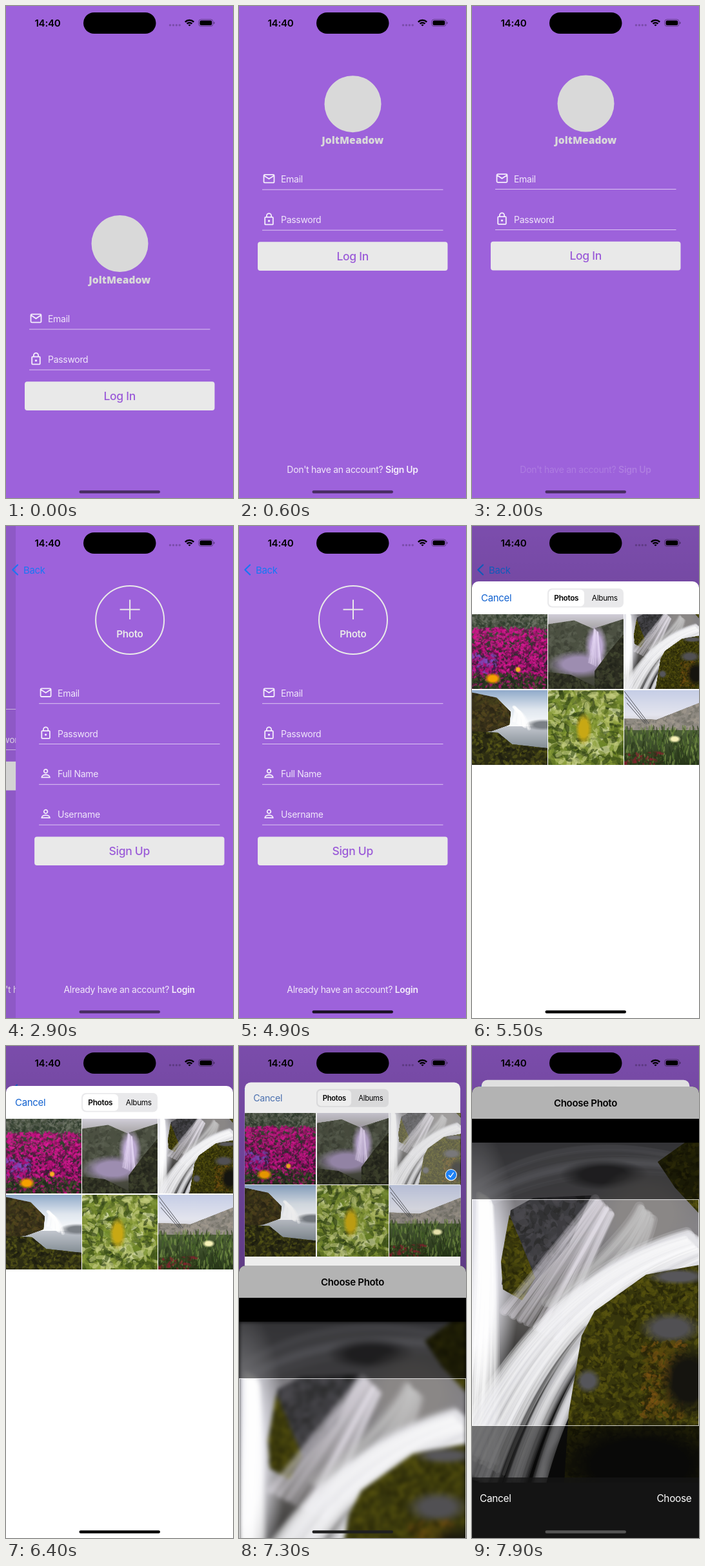
An HTML page with a canvas that plays this animation: 352x764 px, repeating every 8000 ms.

```html
<!DOCTYPE html>
<html lang="en">
<head>
<meta charset="utf-8">
<title>App sign up</title>
<style>
html, body { margin: 0; width: 100%; height: 100%; overflow: hidden; background: #9d62db; }
canvas { display: block; width: 352px; height: 764px; }
</style>
</head>
<body>
<canvas id="stage"></canvas>
<script>
const W = 352, H = 764, LOOP = 8000, TAU = Math.PI * 2;
const PURPLE = '#9d62db', LIGHT = '#e9e9e9', WHITE = '#f4edfb', BLUE = '#1478f5';
const UI = 'Inter, "Noto Sans", sans-serif';
const TOP = 62; // resting top of a sheet
const stage = document.getElementById('stage');
const dpr = window.devicePixelRatio || 1;
stage.width = W * dpr;
stage.height = H * dpr;
const g = stage.getContext('2d');

const clamp = x => Math.max(0, Math.min(1, x));
const lerp = (a, b, p) => a + (b - a) * p;
// system transition: fast start, long exponential tail
const settle = (t, start) => t <= start ? 0 : 1 - Math.exp(-9.15 * (t - start) / 1000);
// critically damped spring
const spring = (t, start) => {
  const x = Math.max(0, t - start) * 0.014;
  return 1 - (1 + x) * Math.exp(-x);
};
const mix = (a, b, p) => `rgb(${a.map((v, i) => Math.round(lerp(v, b[i], p))).join()})`;

function random(seed) {
  return () => {
    seed = (seed * 1664525 + 1013904223) >>> 0;
    return seed / 4294967296;
  };
}

// ---------- photos ----------

function photo(w, h, draw) {
  const cv = document.createElement('canvas');
  cv.width = w * 2;
  cv.height = h * 2;
  const c = cv.getContext('2d');
  c.scale(2, 2);
  draw(c, w, h);
  return cv;
}

function fade(c, y, w, h, ...colors) {
  const f = c.createLinearGradient(0, y, 0, y + h);
  colors.forEach((k, i) => f.addColorStop(i / (colors.length - 1), k));
  c.fillStyle = f;
  c.fillRect(0, y, w, h);
}

function glow(c, color, x, y, rx, ry) {
  const f = c.createRadialGradient(0, 0, 0, 0, 0, 1);
  f.addColorStop(0.5, color);
  f.addColorStop(1, color + '00');
  c.save();
  c.translate(x, y);
  c.scale(rx, ry);
  c.fillStyle = f;
  c.fillRect(-1, -1, 2, 2);
  c.restore();
}

// random soft dabs that cover a rectangle
function dabs(c, colors, size, x, y, w, h, flat = 0.5, tilt = 0, sway = 3) {
  const r = random(Math.round(size * 97 + x + y * 3 + w));
  c.save();
  c.globalAlpha = 0.6;
  for (let n = 1.3 * w * h / size ** 2; n > 0; n--) {
    const s = size * (0.4 + r());
    c.fillStyle = colors[Math.floor(r() * colors.length)];
    c.beginPath();
    c.ellipse(x + r() * w, y + r() * h, s, s * flat, tilt + sway * (r() - 0.5), 0, TAU);
    c.fill();
  }
  c.restore();
}

// a textured patch with the given corners
function land(c, colors, size, ...corners) {
  const xs = corners.map(p => p[0]), ys = corners.map(p => p[1]);
  const x = Math.min(...xs), y = Math.min(...ys);
  c.save();
  c.beginPath();
  corners.forEach(p => c.lineTo(...p));
  c.clip();
  c.fillStyle = colors[0];
  c.fillRect(x, y, 400, 600);
  dabs(c, colors, size, x, y, Math.max(...xs) - x, Math.max(...ys) - y);
  c.restore();
}

// a fan of translucent strands, widening towards its end
function stream(c, color, n, width, from, bend, to, spread) {
  const r = random(n * 31 + spread);
  c.save();
  c.strokeStyle = color;
  c.globalAlpha = 0.22;
  c.lineCap = 'round';
  for (let i = 0; i < n; i++) {
    const s = spread * (r() - 0.5);
    c.lineWidth = width * (0.4 + r());
    c.beginPath();
    c.moveTo(from[0] + s * 0.3, from[1] + s * 0.3);
    c.quadraticCurveTo(bend[0] + s * 0.5, bend[1] + s * 0.5, to[0] + s, to[1] + s * 0.5);
    c.stroke();
  }
  c.restore();
}

function river(c, w, h) {
  const moss = ['#37360c', '#4a480c', '#5c580f', '#252408'];
  const rock = ['#3d3c40', '#4b4a4f', '#2b2a2b'];
  fade(c, 0, w, h, '#6c6c72', '#858387', '#5c5a58', '#161616', '#131313');
  stream(c, '#a8a8b0', 14, 10, [0, 90], [150, 0], [352, 40], 90);
  glow(c, '#e0e0e8', 0, 200, 75, 230);
  stream(c, '#ffffff', 30, 12, [20, 90], [25, 270], [5, 480], 70);
  land(c, rock, 9, [60, 105], [95, 86], [185, 82], [150, 160], [100, 215], [78, 245], [46, 220]);
  land(c, moss, 5, [58, 112], [74, 150], [98, 210], [78, 245], [48, 228], [45, 185]);
  glow(c, '#3e3d40', 205, 50, 70, 24);
  glow(c, '#8a8786', 270, 110, 85, 75);
  stream(c, '#e6e4ea', 30, 9, [205, 100], [150, 190], [95, 285], 95);
  stream(c, '#c8c6ca', 20, 12, [270, 110], [250, 170], [150, 265], 80);
  stream(c, '#e2e2e8', 70, 14, [352, 160], [135, 235], [35, 530], 140);
  stream(c, '#ffffff', 30, 6, [345, 162], [125, 235], [20, 500], 110);
  land(c, moss, 5, [143, 528], [150, 420], [170, 300], [190, 262], [270, 205], [352, 190], [352, 528]);
  glow(c, '#57565a', 320, 208, 50, 13);
  glow(c, '#515053', 308, 288, 50, 26);
  glow(c, '#55555a', 180, 370, 20, 20);
  dabs(c, ['#7a5212', '#594a0e', '#2a2409'], 5, 265, 310, 65, 120);
  glow(c, '#15140f', 335, 370, 45, 60);
  glow(c, '#131310', 260, 500, 150, 75);
  land(c, moss, 5, [288, 30], [330, 0], [352, 0], [352, 110], [315, 70]);
}

function flowers(c, w, h) {
  fade(c, 0, w, h, '#5f6459', '#34402f', '#3b1f38', '#2b3020');
  dabs(c, ['#2c3829', '#707668', '#454f3c'], 3, 0, 0, w, 24);
  dabs(c, ['#d4148c', '#e21c9c', '#b30d76', '#6d0f4c'], 3, 0, 22, w, 74);
  dabs(c, ['#26381f', '#41562a', '#c41381', '#1d2a1b'], 3, 0, 92, w, 24);
  dabs(c, ['#7b4fc0', '#3a2347', '#b30d76'], 3, 0, 60, 38, 32);
  glow(c, '#f5a000', 32, 100, 13, 9);
  glow(c, '#f8b020', 71, 86, 5, 5);
}

function gorge(c, w, h) {
  const slope = ['#4c5042', '#5c6152', '#3c4034'];
  const cliff = ['#2b2c20', '#3a3b2b', '#454a31', '#20221a'];
  fade(c, 0, w, h, '#d2cfda', '#88867e', '#5b5c4f', '#3c3e33');
  land(c, slope, 5, [0, 16], [40, 10], [72, 24], [60, 90], [0, 100]);
  land(c, slope, 5, [66, 24], [w, 8], [w, 70], [86, 70]);
  glow(c, '#9d8db0', 48, 78, 50, 22);
  glow(c, '#bba9d0', 74, 50, 18, 34);
  stream(c, '#ece0fa', 24, 2, [74, 26], [74, 50], [73, 80], 22);
  land(c, cliff, 4, [w, 32], [96, 56], [72, 88], [72, h], [w, h]);
  land(c, cliff, 4, [0, 90], [35, 94], [80, h], [0, h]);
}

function bay(c, w, h) {
  const cliff = ['#39311a', '#594820', '#2a2614', '#47431c'];
  fade(c, 0, w, 60, '#8fa9c9', '#dfe6ee', '#ffffff');
  fade(c, 56, w, 60, '#c2c6ce', '#8b949b', '#565d58');
  glow(c, '#7b8086', 110, 54, 28, 9);
  stream(c, '#ffffff', 40, 4, [68, 30], [76, 32], [76, 54], 26);
  land(c, cliff, 4, [0, 4], [38, 12], [60, 34], [58, 54], [30, 64], [0, 68]);
  land(c, ['#2c2c13', '#5f6018', '#1b1b10', '#4a4a16'], 4, [0, 64], [40, 66], [62, 84], [w, 90], [w, h], [0, h]);
}

function leaves(c, w, h) {
  fade(c, 0, w, h, '#97a05a', '#7d9030', '#5a6d22');
  dabs(c, ['#b9c46c', '#6f8a28', '#d8deae', '#3c5218'], 12, 0, 0, w, h, 0.4);
  dabs(c, ['#8a9f38', '#43591c', '#c3cc80', '#2e4016', '#71862a'], 7, 0, 0, w, h, 0.4);
  glow(c, '#c8a814', 55, 60, 13, 26);
}

function dunes(c, w, h) {
  fade(c, 0, w, h, '#c5cde6', '#e4e5ee', '#b0aaa4', '#3a4a28');
  land(c, ['#8f8a82', '#a49c90', '#76746a'], 4, [0, 44], [50, 46], [w, 20], [w, 75], [0, 75]);
  fade(c, 62, w, 54, '#4d5f38', '#263518');
  dabs(c, ['#5d7c33', '#7f974c', '#263518', '#44602a'], 5, 0, 58, w, 58, 0.22, Math.PI / 2, 0.6);
  dabs(c, ['#8c2030', '#35451f', '#263518'], 3, 0, 96, 60, 20);
  glow(c, '#f7f2b8', 78, 76, 10, 6);
  c.strokeStyle = '#55565c';
  c.lineWidth = 0.8;
  for (let i = 0; i < 3; i++) {
    c.beginPath();
    c.moveTo(i * 2, 2 + i * 9);
    c.lineTo(38 - i * 3, 52);
    c.stroke();
  }
}

const riverPic = photo(W, 528, river);
const riverTile = (c, w, h) => c.drawImage(riverPic, 0, 176, 704, 704, 0, 0, w, h);
const tiles = [flowers, gorge, riverTile, bay, leaves, dunes].map(draw => photo(116, 116, draw));

// ---------- interface parts ----------

function box(x, y, w, h, r, color) {
  g.fillStyle = color;
  g.beginPath();
  g.roundRect(x, y, w, h, r);
  g.fill();
}

function disc(x, y, r, color) {
  g.fillStyle = color;
  g.beginPath();
  g.arc(x, y, r, 0, TAU);
  g.fill();
}

function line(color, width, ...points) {
  g.strokeStyle = color;
  g.lineWidth = width;
  g.beginPath();
  points.forEach(p => g.lineTo(...p));
  g.stroke();
}

// y is the middle of the capitals
function text(s, x, y, size, color, weight = 400, align = 'left', family = UI) {
  g.font = `${weight} ${size}px ${family}`;
  g.letterSpacing = family === UI ? '-0.3px' : '0px';
  g.textAlign = align;
  g.fillStyle = color;
  g.fillText(s, x, y + size * 0.364);
  return g.measureText(s).width;
}

const icons = {
  mail() {
    g.roundRect(-8, -6.3, 16, 12.6, 1.5);
    g.moveTo(-8, -5);
    g.lineTo(0, 0.3);
    g.lineTo(8, -5);
  },
  lock() {
    g.roundRect(-6.3, -3.3, 12.6, 11.6, 1);
    g.moveTo(-3.6, -3.3);
    g.arc(0, -5.5, 3.6, Math.PI, TAU);
    g.lineTo(3.6, -3.3);
    g.moveTo(0.8, 2.6);
    g.arc(0, 2.6, 0.8, 0, TAU);
  },
  person() {
    g.arc(0, -3.6, 2.8, 0, TAU);
    g.moveTo(-6.2, 6);
    g.bezierCurveTo(-6.2, 0.6, 6.2, 0.6, 6.2, 6);
    g.closePath();
  }
};

function field(icon, label, y) {
  g.save();
  g.translate(46.5, y - 1);
  g.strokeStyle = WHITE;
  g.lineWidth = 1.8;
  g.beginPath();
  icons[icon]();
  g.stroke();
  g.restore();
  text(label, 65, y, 14, '#f0e6fa');
  g.fillStyle = '#dcc6f2';
  g.fillRect(36, y + 15.5, 280.5, 1);
}

function button(label, y) {
  box(29, y, 294.5, 44.7, 4, LIGHT);
  text(label, 176.2, y + 22.3, 17.5, '#9a5ad8', 500, 'center');
}

function footer(plain, bold, alpha = 1) {
  const y = 719.5, size = 14;
  g.save();
  g.globalAlpha = 0;
  const wb = text(bold, 0, y, size, WHITE, 600);
  const wp = text(plain, 0, y, size, WHITE);
  const x = 176 - (wp + wb) / 2;
  g.globalAlpha = alpha;
  text(plain, x, y, size, '#f1e8fa');
  text(bold, x + wp, y, size, WHITE, 600);
  g.restore();
}

function login(shift, footAlpha) {
  g.fillStyle = PURPLE;
  g.fillRect(0, 0, W, H);
  g.save();
  g.translate(0, shift);
  disc(176.5, 151.5, 44, '#d9d9d9');
  text('JoltMeadow', 176.3, 208, 15.6, '#d9d9d9', 800, 'center', '"Open Sans", "Noto Sans", sans-serif');
  field('mail', 'Email', 268.5);
  field('lock', 'Password', 331.5);
  button('Log In', 365.7);
  footer("Don't have an account? ", 'Sign Up', footAlpha);
  g.restore();
}

function signUp() {
  g.fillStyle = PURPLE;
  g.fillRect(0, 0, W, H);
  g.strokeStyle = LIGHT;
  g.lineWidth = 2;
  g.beginPath();
  g.arc(177, 146, 53, 0, TAU);
  g.stroke();
  line(LIGHT, 2, [161.5, 129.7], [192.5, 129.7]);
  line(LIGHT, 2, [177, 114.5], [177, 145]);
  text('Photo', 176.8, 167.5, 15.2, LIGHT, 600, 'center');
  const rows = [['mail', 'Email'], ['lock', 'Password'], ['person', 'Full Name'], ['person', 'Username']];
  rows.forEach(([icon, label], i) => field(icon, label, 259.7 + i * 62.8));
  button('Sign Up', 482.4);
  footer('Already have an account? ', 'Login');
}

function backLink(p) {
  g.save();
  g.globalAlpha = p;
  g.translate((1 - p) * 23, 0);
  g.lineCap = g.lineJoin = 'round';
  line(BLUE, 2.2, [17, 60.5], [9.3, 68], [17, 75.5]);
  text('Back', 26, 68.2, 14.9, BLUE);
  g.restore();
}

function statusBar() {
  text('14:40', 64.5, 26.5, 15.2, '#000', 600, 'center');
  box(120, 10, 112.5, 33, 16.5, '#000');
  for (let i = 0; i < 4; i++) disc(254.5 + i * 4.9, 29.8, 1.7, 'rgba(0,0,0,.22)');
  g.strokeStyle = '#000';
  g.lineCap = 'butt';
  g.lineWidth = 2.5;
  [1.5, 5.4, 9.3].forEach(r => {
    g.beginPath();
    g.arc(284.5, 31.3, r, -Math.PI * 0.755, -Math.PI * 0.245);
    g.stroke();
  });
  g.strokeStyle = 'rgba(0,0,0,.38)';
  g.lineWidth = 1;
  g.beginPath();
  g.roundRect(298.8, 20.9, 22.2, 10.6, 3.5);
  g.stroke();
  box(300.5, 22.5, 18.8, 7.4, 2.2, '#000');
  box(322, 24.6, 1.4, 3.4, 0.7, 'rgba(0,0,0,.4)');
}

const sheetTop = p => Math.round(lerp(H, TOP, p));
const sheetBox = (h, color) => box(0, 0, W, h, [10, 10, 0, 0], color);

function picker(p, q) {
  const s = 1 - 0.0833 * q;
  g.save();
  g.translate(176 * (1 - s), sheetTop(p) - 9.3 * q);
  g.scale(s, s);
  sheetBox(800, '#fff');
  text('Cancel', 14, 25.8, 15, mix([18, 98, 208], [120, 135, 175], q));
  box(117, 11, 118, 29.5, 7, '#e9e9eb');
  box(119, 12.8, 55, 26, 6, '#fff');
  text('Photos', 146.3, 25.8, 11.8, '#000', 600, 'center');
  text('Albums', 205.8, 25.8, 11.8, '#000', 400, 'center');
  tiles.forEach((pic, i) => g.drawImage(pic, (i % 3) * 118, 50.5 + Math.floor(i / 3) * 118, 116.5, 116.5));
  if (q > 0) {
    g.fillStyle = 'rgba(255,255,255,.28)';
    g.fillRect(236, 50.5, 116, 116.5);
    sheetBox(800, `rgba(0,0,0,${0.12 * q})`);
    disc(337, 151.3, 9.6, '#fff');
    disc(337, 151.3, 8.6, '#1f82f5');
    line('#fff', 1.4, [333, 151.8], [335.8, 154.8], [341, 147.6]);
  }
  g.restore();
}

function cropper(q, blur) {
  g.save();
  g.translate(0, sheetTop(q));
  sheetBox(720, '#000');
  g.save();
  g.beginPath();
  g.rect(0, 87, W, 528);
  g.clip();
  if (blur > 0) g.filter = `blur(${blur}px)`;
  g.drawImage(riverPic, 0, 87, W, 528);
  g.restore();
  g.fillStyle = 'rgba(0,0,0,.52)';
  g.fillRect(0, 87, W, 88);
  g.fillRect(0, 527, W, 88);
  g.strokeStyle = 'rgba(255,255,255,.75)';
  g.lineWidth = 1;
  g.strokeRect(0.5, 175.5, 351, 351);
  g.fillStyle = 'rgba(20,20,20,.8)';
  g.fillRect(0, 607, W, 8);
  g.fillStyle = '#141414';
  g.fillRect(0, 615, W, 105);
  sheetBox(50, '#b3b3b3');
  text('Choose Photo', 176, 25.2, 15, '#000', 600, 'center');
  text('Cancel', 12, 639.2, 15.4, '#fff');
  text('Choose', 340.5, 639.2, 15.4, '#fff', 400, 'right');
  g.restore();
}

function homeBar(t, q) {
  const alpha = t < 4850 ? 0.55 : t < 5150 ? 0.84 : 1;
  const grey = 85 * q * q;
  box(113.5, 752.3, 125.5, 4.5, 2.25, `rgba(${grey},${grey},${grey},${alpha})`);
}

// ---------- timeline ----------

function draw(t) {
  g.setTransform(dpr, 0, 0, dpr, 0, 0);
  const push = settle(t, 2557);
  const sheet = settle(t, 5131);
  const crop = settle(t, 7200);

  // the link dims while pressed, then recovers
  const foot = t < 1950 ? 1 : lerp(0.2, 1, clamp((t - 2150) / 250));
  g.save();
  g.translate(-0.3 * W * push, 0);
  login(217.5 * (1 - spring(t, 30)), foot);
  g.restore();

  if (push > 0) {
    const x = W * (1 - push);
    g.fillStyle = `rgba(0,0,0,${0.1 * push})`;
    g.fillRect(0, 0, x, H);
    g.save();
    g.translate(x, 0);
    signUp();
    g.restore();
    backLink(push);
  }
  if (sheet > 0) {
    fade(g, 0, W, H, `rgba(0,0,0,${0.22 * sheet})`, `rgba(0,0,0,${0.6 * sheet})`);
    picker(sheet, crop);
  }
  if (crop > 0) cropper(crop, 3 * clamp((7600 - t) / 250));
  statusBar();
  homeBar(t, crop);
}

const begin = performance.now();
function tick() {
  draw((performance.now() - begin) % LOOP);
  requestAnimationFrame(tick);
}
tick();
</script>
</body>
</html>
```
